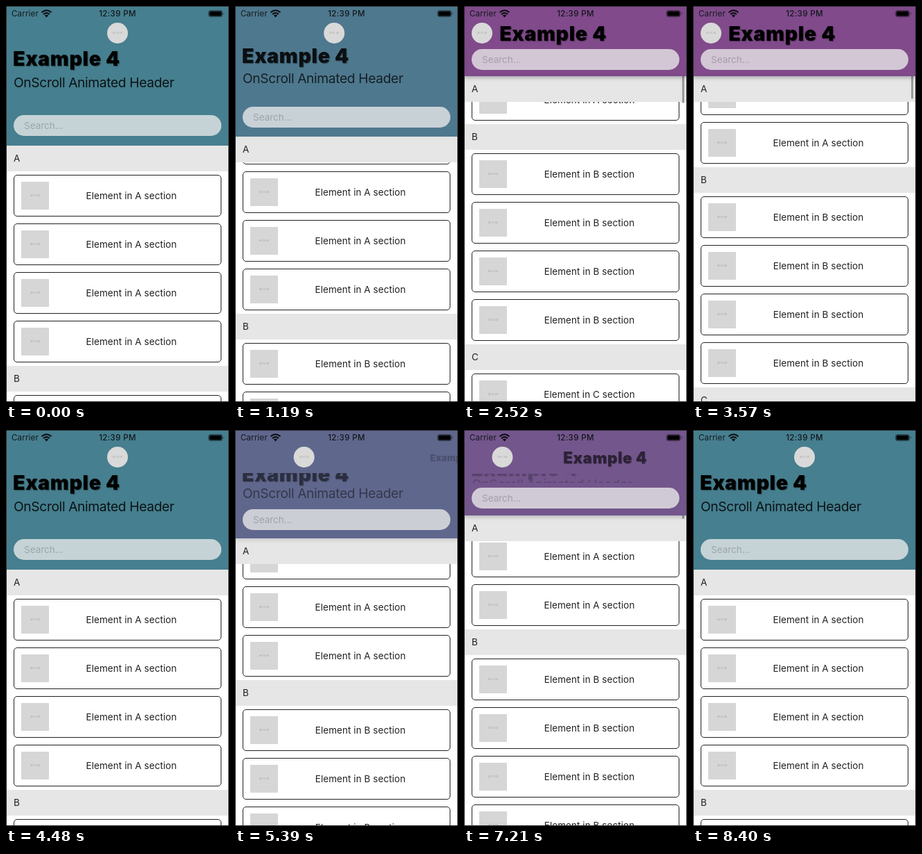
These frames come from a looping animation (322 by 570 pixels, 8.75 s). An HTML page:

```html
<!DOCTYPE html>
<html lang="en">
<head>
<meta charset="utf-8">
<title>Animated header</title>
<style>
  html, body { margin: 0; width: 100%; height: 100%; overflow: hidden; background: #fff; }
  #stage { position: absolute; left: 0; top: 0; width: 322px; height: 570px; overflow: hidden;
    background: #fff; color: #222; font: 13.5px Inter, Roboto, sans-serif; white-space: nowrap; }
  #stage * { position: absolute; box-sizing: border-box; }
  #list { left: 0; top: 0; width: 322px; will-change: transform; }
  .card { left: 11px; width: 300px; height: 60px; border: 1px solid #222; border-radius: 5px; background: #fff; }
  .card b { left: 0; width: 338px; line-height: 58px; text-align: center; font-weight: 400; letter-spacing: .06px; }
  .thumb { left: 10px; top: 9px; width: 40px; height: 40px; background: #d6d6d6; }
  .tiny { color: #a2a2a2; font-size: 4px; text-align: center; }
  .thumb.tiny { line-height: 40px; }
  .section { left: 0; top: 0; width: 322px; height: 37px; padding-left: 11px; line-height: 37px; background: #e6e6e6; }
  #bar { left: 315px; top: 0; width: 3px; height: 57px; border-radius: 2px; background: #999; }
  #header { left: 0; top: 0; width: 322px; }
  #clip { left: 0; top: 60px; width: 322px; overflow: hidden; }
  .title { font-size: 28.5px; font-weight: 900; line-height: 36px; letter-spacing: .7px; color: #000;
    text-shadow: 1px 1px 1px rgba(0, 0, 0, .45); }
  #big { left: 10px; top: -2.5px; }
  #sub { left: 11px; top: 37.5px; font-size: 19.3px; line-height: 24px; letter-spacing: -.4px; color: rgba(0, 0, 0, .85); }
  #small { left: 0; top: 39.5px; }
  #avatar { left: 11px; top: 24px; width: 30px; height: 30px; border-radius: 50%; background: #d9d9d9; line-height: 30px; }
  #search { left: 11px; width: 300px; height: 30px; border-radius: 15px; padding-left: 15px; line-height: 30px;
    background: rgba(235, 235, 235, .78); color: rgba(60, 60, 80, .3); }
  .status { top: 3px; line-height: 16px; font-size: 11.6px; letter-spacing: .15px; color: #14181c; }
  #clock { left: 0; width: 322px; text-align: center; font-weight: 500; letter-spacing: .3px; }
  #icons { left: 0; top: 0; }
  #frame { inset: 0; border: 1px solid #2a2a2e; }
</style>
</head>
<body>
<div id="stage">
  <div id="list"></div>
  <div id="sections"></div>
  <div id="bar"></div>
  <div id="header">
    <div id="clip">
      <div id="big" class="title">Example 4</div>
      <div id="sub">OnScroll Animated Header</div>
    </div>
    <div id="small" class="title">Example 4</div>
    <div id="avatar" class="tiny">30 x 30</div>
    <div id="search">Search...</div>
    <div class="status" style="left:8px">Carrier</div>
    <div class="status" id="clock">12:39 PM</div>
    <svg id="icons" width="322" height="24" fill="none" stroke="#0c0c10">
      <path d="M51.5 9.2Q58.5 3.2 65.5 9.2M54 11.9Q58.5 8 63 11.9" stroke-width="2"/>
      <path d="M55.9 13.6Q58.5 11.6 61.1 13.6L58.5 16.4Z" fill="#0c0c10" stroke="none"/>
      <rect x="292.5" y="6.5" width="20" height="9" rx="2.5" stroke-opacity=".5"/>
      <rect x="293.5" y="7.5" width="18" height="7" rx="1.5" fill="#000" stroke="none"/>
      <path d="M314 9.5q1.6 1.5 0 3z" fill="#0c0c10" stroke="none"/>
    </svg>
  </div>
  <div id="frame"></div>
</div>
<script>
const LOOP = 8750, STEP = 70, LAG = 60;
const TOP = 201, SHRINK = 100, RANGE = 300;
const SECTION_H = 37, ROW = 70, SECTION = SECTION_H + 4 * ROW;

// Scroll offset over time: [ms, px]
const KEYS = [
  [0, 0], [1000, 0], [1330, 160], [1600, 297], [1750, 302], [2200, 335], [2660, 350],
  [3060, 350], [3430, 325], [3570, 286], [3920, 80], [4340, 0],
  [4850, 0], [5250, 110], [5740, 264], [6090, 287], [6510, 298],
  [6630, 298], [6930, 247], [7210, 231], [7490, 208], [7800, 62], [8050, 0], [LOOP, 0]
];
const $ = id => document.getElementById(id);
const mix = (a, b, t) => a + (b - a) * t;
const slope = i => (KEYS[i + 1][1] - KEYS[i][1]) / (KEYS[i + 1][0] - KEYS[i][0]);

// Monotone tangent: harmonic mean of the neighbouring slopes
function tangent(i) {
  if (i === 0 || i === KEYS.length - 1) return 0;
  const a = slope(i - 1), b = slope(i);
  return a * b > 0 ? 2 * a * b / (a + b) : 0;
}

function scrollAt(ms) {
  const time = Math.max(0, ms);
  let i = 0;
  while (i < KEYS.length - 2 && time >= KEYS[i + 1][0]) i++;
  const [t0, y0] = KEYS[i], [t1, y1] = KEYS[i + 1];
  const d = t1 - t0, u = (time - t0) / d, v = 1 - u;
  return y0 * v * v * (1 + 2 * u) + y1 * u * u * (3 - 2 * u)
    + d * u * v * (tangent(i) * v - tangent(i + 1) * u);
}

function add(parent, className, text = "", tag = "div") {
  const el = document.createElement(tag);
  el.className = className;
  el.textContent = text;
  return parent.appendChild(el);
}

const sections = [..."ABC"].map((letter, i) => {
  for (let k = 0; k < 4; k++) {
    const card = add($("list"), "card");
    card.style.top = TOP + i * SECTION + SECTION_H + 5 + k * ROW + "px";
    add(card, "thumb tiny", "40 x 40");
    add(card, "", `Element in ${letter} section`, "b");
  }
  return add($("sections"), "section", letter);
});

const moveY = (el, y) => { el.style.transform = `translateY(${y}px)`; };

function drawHeader(p) {
  const height = Math.round(TOP - SHRINK * p), rest = 1 - p;
  const searchTop = height - 39 - 5 * rest;
  const rgb = [mix(70, 128, p), mix(127, 74, p), mix(143, 139, p)].map(Math.round);
  $("header").style.height = height + "px";
  $("header").style.background = `rgb(${rgb})`;
  $("header").style.boxShadow = `0 2px 6px rgba(0,0,0,${.3 * p})`;
  $("search").style.top = searchTop + "px";

  const clipTop = 60 + 4 * p;
  $("clip").style.top = clipTop + "px";
  $("clip").style.height = Math.max(0, searchTop - 7 - clipTop) + "px";
  $("clip").style.opacity = rest;
  moveY($("big"), -29 * p);
  moveY($("sub"), -45 * p);

  $("avatar").style.transform = `translateX(${135 * rest}px)`;
  $("small").style.opacity = p * p;
  $("small").style.transform = `translate(${128.5 + 345 * rest}px) translate(-50%, -50%) scale(${p})`;
  return height;
}

function draw(now) {
  const time = Math.floor((now % LOOP) / STEP) * STEP;
  const scroll = Math.round(scrollAt(time));
  const height = drawHeader(Math.min(1, scrollAt(time - LAG) / RANGE));
  moveY($("list"), -scroll);
  moveY($("bar"), 48 + .1 * scroll);
  sections.forEach((el, i) => {
    const natural = TOP + i * SECTION - scroll;
    moveY(el, Math.min(Math.max(natural, height), natural + SECTION - SECTION_H));
  });
}

let start;
function tick(now) {
  start ??= now;
  draw(now - start);
  requestAnimationFrame(tick);
}
draw(0);
requestAnimationFrame(tick);
</script>
</body>
</html>
```
